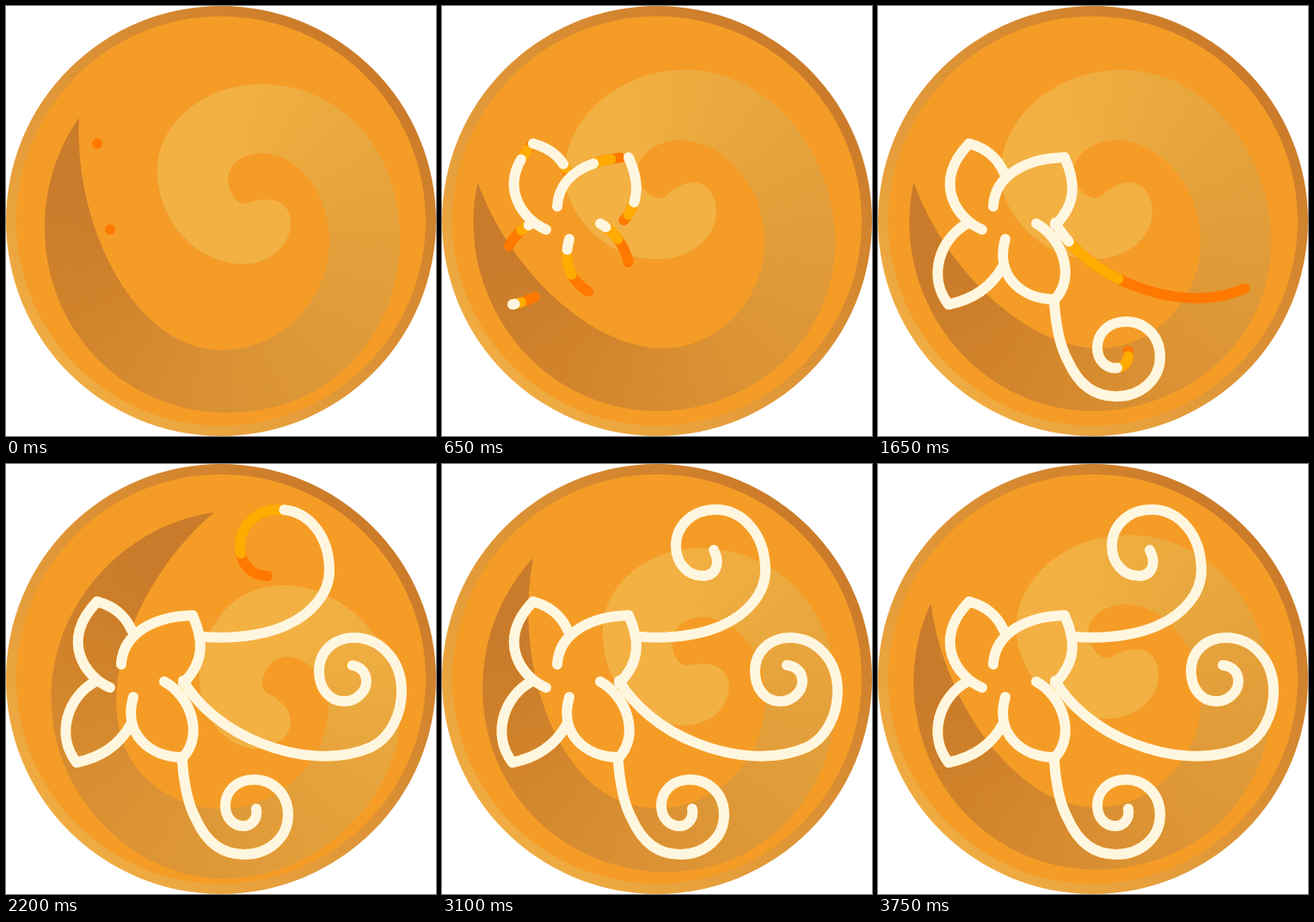
Write an HTML page that moves like this. It is 500 px wide and 500 px high and loops after 3.8 s.

```html
<!DOCTYPE html>
<html lang="en">
<head>
<meta charset="utf-8">
<title>Swirl and blossom</title>
<style>
  html, body { margin: 0; width: 100%; height: 100%; overflow: hidden; background: #fff; }
  .stage { position: relative; width: 500px; height: 500px; overflow: hidden; }
  .stage * { position: absolute; }
  .rim { inset: 0; border-radius: 50%; background: linear-gradient(45deg, #f1ae43 12%, #ca7928 88%); }
  .disc { inset: 12px; border-radius: 50%; background: #f59c27; }
  .swirl {
    inset: 0;
    transform-origin: 249px 275px;
    clip-path: path("M85 130C60 165 45 210 45 257C45 380 140 473 258 473C375 473 458 385 458 270C458 170 392 91 297 91C228 91 176 138 176 192C176 252 224 300 275 300C309 300 331 277 331 252C331 234 318 225 303 225C288 225 282 230 276 230C268 230 258 216 258 202C258 184 275 171 296 171C340 171 376 218 376 272C376 345 318 400 250 400C150 400 78 255 85 130Z");
  }
  .swirl > * { inset: 0; }
  .tone {
    background: conic-gradient(from 314deg at 249px 275px,
      #f3b143 50deg, #ebaa3f 90deg, #e4a03a 137deg, #da9032 226deg, #d08129 290deg, #c97a29 330deg);
  }
  .grain {
    opacity: .3;
    -webkit-mask-image: conic-gradient(from 314deg at 249px 275px, transparent 40deg, #000 150deg);
    mask-image: conic-gradient(from 314deg at 249px 275px, transparent 40deg, #000 150deg);
  }
  .core { background: radial-gradient(circle at 249px 275px, #f3b143 109px, rgba(243, 177, 67, 0) 116px); }
  .lines { inset: 0; fill: none; stroke-width: 12; stroke-linecap: round; stroke-linejoin: round; }
</style>
</head>
<body>
<div class="stage">
  <div class="rim"></div>
  <div class="disc"></div>
  <div class="swirl" id="swirl">
    <div class="tone"></div>
    <svg class="grain" width="500" height="500">
      <filter id="noise" x="0" y="0" width="100%" height="100%">
        <feTurbulence type="fractalNoise" baseFrequency=".8" numOctaves="2" seed="4"/>
        <feColorMatrix values="0 0 0 0 .68  0 0 0 0 .38  0 0 0 0 .1  3 0 0 0 -1.4"/>
      </filter>
      <rect width="500" height="500" filter="url(#noise)"/>
    </svg>
    <div class="core"></div>
  </div>
  <svg class="lines" id="lines" width="500" height="500"></svg>
</div>
<script>
const LOOP = 3800, STEP = 50, SPIN = 1000;

// Each stroke is drawn three times: a quick orange, then yellow, then cream.
const COATS = [
  { color: '#ff7800', lag: 0, span: 500 },
  { color: '#ffab00', lag: 15, span: 600 },
  { color: '#fff6e0', lag: 50, span: 700 }
];

const STROKES = [
  { start: 270, dot: true, d: 'M121 260C92 248 62 205 106 160' },
  { start: 270, dot: true, d: 'M106 160C125 165 138 175 146 193' },
  { start: 350, d: 'M134 233C136 195 175 177 217 176' },
  { start: 350, d: 'M217 176C230 205 231 230 206 255' },
  { start: 465, d: 'M148 271C136 312 165 341 206 341' },
  { start: 485, d: 'M184 253C215 270 230 315 206 341' },
  { start: 515, d: 'M104 253C72 270 57 315 82 347' },
  { start: 515, d: 'M82 347C107 342 130 330 145 303' },
  { start: 1150, d: 'M205 346C207 372 211 395 221 413C233 440 252 454 277 454C306 454 328 434 328 408C328 384 311 367 288 367C268 367 255 381 255 397C255 412 265 421 276 421C286 421 293 412 291 401' },
  { start: 1505, d: 'M206 252C222 280 255 309 297 325C335 340 385 347 425 329C447 318 460 291 460 264C460 228 435 202 405 202C381 202 364 218 364 241C364 262 377 276 393 276C408 276 419 264 419 253C419 241 411 235 401 234' },
  { start: 1900, d: 'M230 201C262 203 295 201 325 188C357 174 376 149 376 124C376 82 350 53 318 53C291 53 272 72 272 95C272 116 286 130 303 130C317 130 325 118 316 100' }
];

// cubic-bezier(.45, 0, .05, 1)
function ease(x) {
  if (x <= 0) return 0;
  if (x >= 1) return 1;
  let lo = 0, hi = 1;
  for (let i = 0; i < 24; i++) {
    const t = (lo + hi) / 2, s = 1 - t;
    if (3 * s * s * t * .45 + 3 * s * t * t * .05 + t * t * t < x) lo = t;
    else hi = t;
  }
  return lo * lo * (3 - 2 * lo);
}

const swirl = document.getElementById('swirl');
const lines = document.getElementById('lines');

const parts = COATS.flatMap((coat, layer) => STROKES.map(stroke => {
  const path = document.createElementNS('http://www.w3.org/2000/svg', 'path');
  path.setAttribute('d', stroke.d);
  path.setAttribute('stroke', coat.color);
  path.setAttribute('pathLength', 1);
  lines.append(path);
  return { path, start: stroke.start + coat.lag, span: coat.span, dot: stroke.dot && layer === 0 };
}));

function draw(t) {
  swirl.style.transform = `rotate(${360 * ease(t % SPIN / SPIN)}deg)`;
  for (const { path, start, span, dot } of parts) {
    const x = (t - start) / span;
    path.style.display = x > 0 || dot ? '' : 'none';
    path.setAttribute('stroke-dasharray', x >= 1 ? 'none' : `${ease(x)} 2`);
  }
}

function tick() {
  const t = performance.now() + 2;
  draw(Math.floor(t % LOOP / STEP) * STEP);
  requestAnimationFrame(tick);
}
tick();
</script>
</body>
</html>
```
